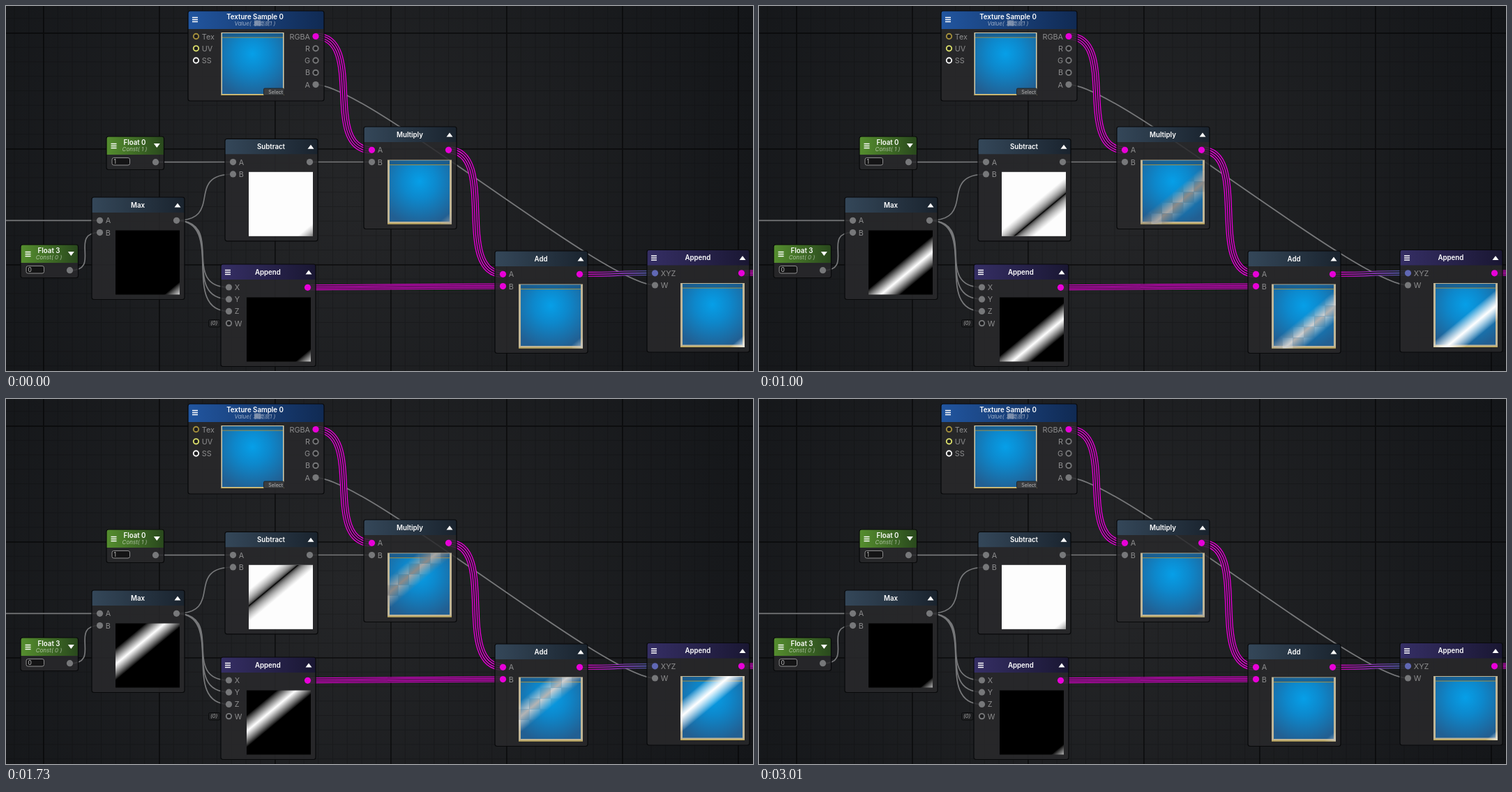
An HTML page for the animation above (3.06 s loop, 1071x523 px).

```html
<!DOCTYPE html>
<html lang="en">
<head>
<meta charset="utf-8">
<title>Shader graph</title>
<style>
html, body { margin: 0; height: 100%; overflow: hidden; background: #18191b; }
svg { display: block; width: 100vw; height: 100vh; }
text { font: 10.8px Inter, "Noto Sans CJK SC", sans-serif; fill: #8d8d8e; }
.title { font-size: 9.7px; font-weight: 600; fill: #fff; text-anchor: middle; }
.sub { font-size: 8px; font-style: italic; fill: #ffffff90; text-anchor: middle; }
.small { font-size: 7px; fill: #b4b4b4; }
.end { text-anchor: end; }
</style>
</head>
<body>
<svg id="stage" viewBox="0 0 1071 523" preserveAspectRatio="none"></svg>
<script>
const LOOP = 3060, SPEED = 0.066, SPAN = LOOP * SPEED, SLOPE = 0.83, HALF = 23, START = 173;
const PINK = '#e800d8', GREY = '#77787a', BACK = '#1a1b1d';
const stage = document.getElementById('stage');

// Repeating diagonal band; curve maps band strength 0..1 to opacity.
function bandGradient(id, color, curve) {
  const k = SPAN / (1 + SLOPE * SLOPE), n = 24;
  let stops = '';
  for (let i = 0; i <= n; i++) {
    const u = 2 * i / n - 1;
    const at = 0.5 + u * HALF / SPAN;
    stops += `<stop offset="${at}" stop-color="${color}" stop-opacity="${curve(1 - Math.abs(u))}"/>`;
  }
  return `<linearGradient id="${id}" class="band" gradientUnits="userSpaceOnUse" spreadMethod="repeat"
    x1="0" y1="0" x2="${SLOPE * k}" y2="${k}">${stops}</linearGradient>`;
}

const ramp = (id, a, b, extra = '') =>
  `<linearGradient id="${id}" ${extra}><stop stop-color="${a}"/><stop offset="1" stop-color="${b}"/></linearGradient>`;

const rect = (x, y, w, h, fill, extra = '') =>
  `<rect x="${x}" y="${y}" width="${w}" height="${h}" fill="${fill}" ${extra}/>`;

const text = (x, y, str, cls = '') => `<text x="${x}" y="${y}" class="${cls}">${str}</text>`;

function grid(id, size, line, alpha) {
  return `<pattern id="${id}" x="53" y="38" width="${size}" height="${size}" patternUnits="userSpaceOnUse">
    <path d="M0 0V${size}M0 0H${size}" stroke="#000" stroke-width="${line}" stroke-opacity="${alpha}"/></pattern>`;
}

const defs = `<defs>
  <radialGradient id="back" gradientUnits="userSpaceOnUse" cx="500" cy="265" r="620">
    <stop stop-color="#252628"/><stop offset="1" stop-color="#141619"/></radialGradient>
  <radialGradient id="water" cx=".5" cy=".34" r=".72">
    <stop stop-color="#069fe8"/><stop offset=".4" stop-color="#0d88cc"/><stop offset="1" stop-color="#225f92"/></radialGradient>
  ${grid('minor', 20.75, 2, 0.2)}${grid('major', 166, 4, 0.45)}
  ${ramp('blue', '#2158a6', '#0f2a55')}${ramp('slate', '#35495c', '#19232e')}
  ${ramp('violet', '#362f68', '#191633')}${ramp('green', '#58942f', '#294a1c')}
  ${ramp('fade', PINK, '#5a63c0', 'gradientUnits="userSpaceOnUse" x1="834" x2="919" y1="0" y2="0"')}
  ${bandGradient('glow', '#fff', v => v ** 0.85)}
  ${bandGradient('shade', '#000', v => 1 - (1 - v) ** 0.5)}
  ${bandGradient('multLight', '#a8a6a4', v => v)}
  ${bandGradient('multDark', '#8c8a88', v => v)}
  ${bandGradient('addLight', '#cfcfcf', v => v)}
  ${bandGradient('addDark', '#b4b4b4', v => v)}
  ${bandGradient('shine', '#fff', v => v ** 0.85)}
</defs>`;

// Wires: one plain line, or several parallel lines made of nested strokes.
function wire(x1, y1, x2, y2, color = GREY, widths = [1.7]) {
  const d = Math.min(72, 0.66 * Math.hypot(x2 - x1, y2 - y1));
  const path = `M${x1} ${y1}C${x1 + d} ${y1} ${x2 - d} ${y2} ${x2} ${y2}`;
  return widths.map((w, i) =>
    `<path d="${path}" fill="none" stroke="${i % 2 ? BACK : color}" stroke-width="${w}"/>`).join('');
}
const FOUR = [10.2, 7.6, 4.4, 1.8], FLAT = [8, 5.8, 3.6, 1.2], THREE = [7, 4.8, 1.3];

const dot = (x, y, c = GREY) => `<circle cx="${x}" cy="${y}" r="4.6" fill="${c}"/>`;
const ring = (x, y, c = GREY) => `<circle cx="${x}" cy="${y}" r="3.7" fill="#1d1d1f" stroke="${c}" stroke-width="1.9"/>`;
const input = (x, y, name, c, shape = dot) => shape(x, y, c) + text(x + 8.3, y + 4, name);
const menu = (x, y) => `<path d="M${x - 4} ${y - 3}h8m-8 3h8m-8 3h8" stroke="#fff" stroke-width="1.4"/>`;
const arrow = (x, y, s) => `<path d="M${x - 4.5} ${y + 3 * s}h9l-4.5 ${-6 * s}z" fill="#fff"/>`;

function frame(x, y, w, h, head, fill) {
  return rect(x, y, w, h, '#29292b', 'rx="3" fill-opacity=".84"') +
    `<path d="M${x} ${y + head}v${3 - head}q0 -3 3 -3h${w - 6}q3 0 3 3v${head - 3}z" fill="url(#${fill})" fill-opacity=".95"/>` +
    rect(x, y, w, h, 'none', 'rx="3" stroke="#08090a" stroke-width="1.2"');
}

function picture(size, side, foot, edge) {
  return rect(0, 0, size, size, edge) +
    rect(side, 1, size - 2 * side, size - 1 - foot, 'url(#water)') +
    rect(side, 1, size - 2 * side, 6, '#1d527f', 'fill-opacity=".65"') +
    rect(side, 6.6, size - 2 * side, 1, '#a08f45') +
    rect(0, size - 1.3, size, 1.3, '#c0a64f');
}

function checker(light, dark) {
  const n = 6, c = 92 / n, paths = ['', ''];
  for (let i = 0; i < n * n; i++) {
    const col = i % n, row = Math.floor(i / n);
    paths[(col + row) % 2] += `M${col * c} ${row * c}h${c}v${c}h${-c}z`;
  }
  return `<path d="${paths[0]}" fill="url(#${light})"/><path d="${paths[1]}" fill="url(#${dark})"/>`;
}

const full = fill => rect(0, 0, 92, 92, fill);
const pool = picture(92, 3, 3.5, '#bfb596');
const views = {
  mask: full('#000') + full('url(#glow)'),
  inverse: full('#fdfdfd') + full('url(#shade)'),
  mult: pool + checker('multLight', 'multDark'),
  add: pool + checker('addLight', 'addDark'),
  final: pool + full('url(#shine)')
};
const place = (x, y, art) => `<g transform="translate(${x} ${y})">${art}</g>`;

function opNode(x, y, name, view, aColor = GREY, bColor = GREY, outColor = GREY) {
  return frame(x, y, 133, 146.5, 22, 'slate') + text(x + 66, y + 14.5, name, 'title') + arrow(x + 123, y + 11.5, 1) +
    input(x + 11.5, y + 33.3, 'A', aColor) + input(x + 11.5, y + 50.6, 'B', bColor) +
    dot(x + 121.5, y + 33.3, outColor) + place(x + 34, y + 47.5, views[view]);
}

function appendNode(x, y, w, view, ports) {
  return frame(x, y, w, 146.5, 22, 'violet') + menu(x + 10, y + 11.5) + arrow(x + w - 10, y + 11.5, 1) +
    text(x + w / 2 - 0.7, y + 14.5, 'Append', 'title') + ports + dot(x + w - 11.5, y + 33.3, PINK) +
    place(x + w - 99, y + 47.5, views[view]);
}

function floatNode(x, y, name, value) {
  return frame(x, y, 82.5, 47.5, 26, 'green') + menu(x + 10.5, y + 13.5) + arrow(x + 72.3, y + 13, -1) +
    text(x + 40.5, y + 12.3, name, 'title') + text(x + 40.5, y + 21.3, `Const( ${value} )`, 'sub') +
    rect(x + 8, y + 30.5, 25.5, 10.5, '#141415', 'rx="2.5" stroke="#9a9a9a" stroke-width=".9"') +
    `<text x="${x + 10.5}" y="${y + 39}" style="font-size:8.5px;fill:#c4c4c4">${value}</text>` +
    dot(x + 70.5, y + 36.7);
}

function textureNode() {
  const rows = [43.5, 60.8, 78, 95.4, 112.6];
  return frame(261, 7, 195, 129, 26, 'blue') + menu(271, 19.5) +
    text(357, 19, 'Texture Sample 0', 'title') + text(357, 28, 'Value( 水面底1 )', 'sub') +
    rect(356, 20.5, 9, 8, '#8d9bb5', 'fill-opacity=".8"') +
    ['Tex', 'UV', 'SS'].map((s, i) => input(272.5, rows[i], s, ['#a48f3c', '#d8dc6a', '#f4f4f4'][i], ring)).join('') +
    ['RGBA', 'R', 'G', 'B', 'A'].map((s, i) => text(436, rows[i] + 4, s, 'end') +
      (i % 4 ? ring : dot)(444, rows[i], i ? GREY : PINK)).join('') +
    place(308.5, 38, picture(90, 1.5, 2, '#d6cfae')) +
    rect(369.5, 118, 29, 10, '#3b3d40', 'rx="1.5" stroke="#1b1c1e" stroke-width=".8"') +
    text(397, 125.8, 'Select', 'small end');
}

const wires =
  wire(-120, 307.3, 134.5, 307.3) + wire(92, 379, 134.5, 324.5) + wire(244, 307.3, 325, 241) +
  [403, 420, 437.5].map(y => wire(244, 307.3, 320, y)).join('') +
  wire(214, 223.7, 325, 223.5) + wire(435, 223.5, 524, 223.5) + wire(444, 112.6, 930.5, 400) +
  wire(444, 43.5, 524, 206.3, PINK, FOUR) + wire(634, 206.3, 712.5, 384, PINK, FOUR) +
  wire(433, 403.2, 712.5, 401.5, PINK, FLAT) + wire(823, 384.3, 930.5, 382.5, 'url(#fade)', THREE) +
  wire(1054, 382.5, 1200, 382.5, PINK, FLAT);

stage.innerHTML = defs +
  ['back', 'minor', 'major'].map(id => rect(0, 0, 1071, 523, `url(#${id})`)).join('') + wires +
  textureNode() + floatNode(144, 187, 'Float 0', 1) + floatNode(21, 342, 'Float 3', 0) +
  opNode(123, 274, 'Max', 'mask') + opNode(314, 190.3, 'Subtract', 'inverse') +
  opNode(513, 173, 'Multiply', 'mult', PINK, GREY, PINK) + opNode(701, 351, 'Add', 'add', PINK, PINK, PINK) +
  appendNode(308, 370, 136, 'mask', ['X', 'Y', 'Z', 'W'].map((s, i) =>
    input(319.5, 403 + 17.2 * i, s, GREY, i < 3 ? dot : ring)).join('')) +
  appendNode(919, 349.5, 147, 'final', input(930.5, 382.8, 'XYZ', '#6068b4') + input(930.5, 400, 'W')) +
  rect(290.5, 449.5, 16.5, 10.5, '#1f2022', 'rx="2" stroke="#0b0c0d"') +
  '<text x="293" y="457.3" style="font-size:7.5px;font-style:italic;fill:#a8a8a8">(0)</text>';

const bands = stage.querySelectorAll('.band');
function draw(now) {
  const shift = START - SPEED * (now % LOOP) - SPAN / 2;
  bands.forEach(b => b.setAttribute('gradientTransform', `translate(0 ${shift})`));
  requestAnimationFrame(draw);
}
draw(0);
</script>
</body>
</html>
```
